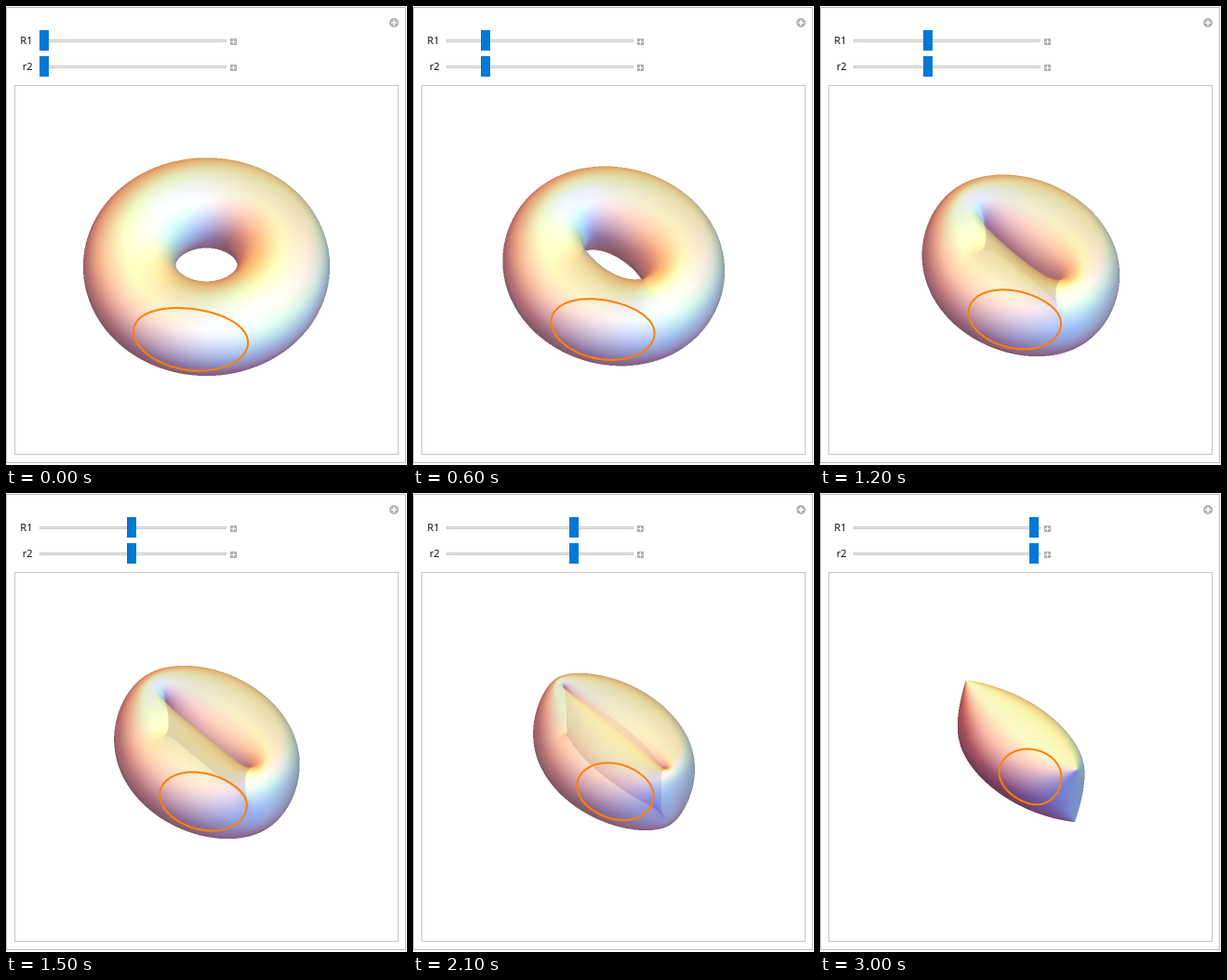
These frames come from a looping animation (431x494 px, 4000 ms). An HTML page with a canvas:

```html
<!DOCTYPE html>
<html lang="en">
<head>
<meta charset="utf-8">
<title>Torus with two varying radii</title>
<style>
html, body { margin: 0; width: 100%; height: 100%; overflow: hidden; background: #fff; }
canvas, svg { position: absolute; display: block; }
canvas { left: 80px; top: 160px; width: 272px; height: 240px; }
svg { left: 0; top: 0; }
text { font: 11px "Noto Sans", "Open Sans", sans-serif; fill: #111; text-anchor: end; }
</style>
</head>
<body>
<canvas id="solid" width="544" height="480"></canvas>
<svg width="431" height="494" viewBox="0 0 431 494" fill="none">
  <rect x="0.5" y="1.5" width="429" height="490" stroke="#b9b9b9"/>
  <rect x="9.5" y="85.5" width="412" height="397" stroke="#c6c6c6"/>
  <circle cx="417" cy="18" r="5" fill="#b2b2b2"/>
  <path d="M414 18h6M417 15v6" stroke="#fff" stroke-width="1.6"/>
  <g id="sliders"></g>
  <path id="loop" stroke="#ff8000" stroke-width="2"/>
</svg>
<script>
const STEPS = 10, STEP_MS = 300, LOOP_MS = 4000;
const UNIT = 16.56, CX = 215.5, CY = 278, CAMERA = 2100;
const R = 5, TUBE = 3;
const LEFT = 80, TOP = 160, SS = 2, W = 544, H = 480;
const NU = 160, NV = 80, LAYERS = 6, OPACITY = 0.77, GLOSS = 0.24;
const TAU = 2 * Math.PI;

// View along (1, 1, 2): image right, image up, toward the viewer
const dot = (a, b) => a[0] * b[0] + a[1] * b[1] + a[2] * b[2];
const unit = a => { const n = Math.hypot(...a) || 1; return a.map(c => c / n); };
const AXES = [[-1, 1, 0], [-1, -1, 1], [1, 1, 2]].map(unit);
const toView = p => AXES.map(a => dot(a, p));

const AMBIENT = [0.4, 0.2, 0.2];
const LIGHTS = [
  [[1.5, -0.5, 1.5], [0, 0.18, 0.5]],
  [[1.5, 1.5, 2.5], [0.18, 0.5, 0.18]],
  [[-0.5, 1.5, 1.5], [0.5, 0.18, 0]],
  [[-0.5, -0.5, 1.5], [0, 0, 0.18]]
].map(([at, rgb]) => {
  const dir = unit(at);
  return { dir, rgb, half: unit([dir[0], dir[1], dir[2] + 1]) };
});

function shade(n) {
  const c = AMBIENT.slice();
  for (const { dir, half, rgb } of LIGHTS) {
    const d = dot(n, dir);
    if (d <= 0) continue;
    const k = d + GLOSS * Math.max(0, dot(n, half)) ** 3;
    for (let i = 0; i < 3; i++) c[i] += k * rgb[i];
  }
  return c.map(x => Math.min(1, x) * 255);
}

const radii = k => ({ R1: R * (1 - k / STEPS), r2: TUBE * (1 - k / STEPS) });

function project(u, v, { R1, r2 }) {
  const p = toView([
    (R1 + TUBE * Math.cos(v)) * Math.cos(u),
    (R + r2 * Math.cos(v)) * Math.sin(u),
    TUBE * Math.sin(v)
  ]).map(c => c * UNIT);
  const s = CAMERA / (CAMERA - p[2]);
  return { x: CX + p[0] * s, y: CY - p[1] * s, z: p[2] };
}

function normal(u, v, { R1, r2 }) {
  const cu = Math.cos(u), su = Math.sin(u), cv = Math.cos(v), sv = Math.sin(v);
  const a = R1 + TUBE * cv, b = R + r2 * cv;
  return unit(toView([
    b * TUBE * cu * cv,
    a * TUBE * su * cv,
    sv * (a * r2 * su * su + b * TUBE * cu * cu)
  ]));
}

function vertex(u, v, rad) {
  const p = project(u, v, rad), n = normal(u, v, rad);
  return {
    x: (p.x - LEFT) * SS, y: (p.y - TOP) * SS, z: p.z,
    front: shade(n), back: shade(n.map(c => -c))
  };
}

const depth = new Float32Array(W * H * LAYERS);
const color = new Float32Array(W * H * LAYERS * 3);
const count = new Uint8Array(W * H);

// Keep the fragments of each pixel sorted, nearest first
function addFragment(px, z, r, g, b) {
  const base = px * LAYERS;
  let i = count[px];
  if (i === LAYERS) {
    if (depth[base + i - 1] >= z) return;
    i--;
  } else count[px]++;
  while (i > 0 && depth[base + i - 1] < z) {
    depth[base + i] = depth[base + i - 1];
    const to = (base + i) * 3;
    color.copyWithin(to, to - 3, to);
    i--;
  }
  depth[base + i] = z;
  const at = (base + i) * 3;
  color[at] = r; color[at + 1] = g; color[at + 2] = b;
}

function fillTriangle(a, b, c) {
  const area = (b.x - a.x) * (c.y - a.y) - (b.y - a.y) * (c.x - a.x);
  if (Math.abs(area) < 1e-7) return;
  const side = area < 0 ? "front" : "back";
  const ca = a[side], cb = b[side], cc = c[side];
  const corners = [a, b, c];
  const y0 = Math.max(0, Math.ceil(Math.min(a.y, b.y, c.y) - 0.5));
  const y1 = Math.min(H, Math.ceil(Math.max(a.y, b.y, c.y) - 0.5));
  for (let y = y0; y < y1; y++) {
    const py = y + 0.5;
    let lo = Infinity, hi = -Infinity;
    for (let i = 0; i < 3; i++) {
      let p = corners[i], q = corners[(i + 1) % 3];
      if (p.y > q.y) [p, q] = [q, p];
      if (py < p.y || py >= q.y) continue;
      const x = p.x + (q.x - p.x) * (py - p.y) / (q.y - p.y);
      lo = Math.min(lo, x);
      hi = Math.max(hi, x);
    }
    const x0 = Math.max(0, Math.ceil(lo - 0.5)), x1 = Math.min(W, Math.ceil(hi - 0.5));
    for (let x = x0; x < x1; x++) {
      const px = x + 0.5;
      const wb = ((px - a.x) * (c.y - a.y) - (py - a.y) * (c.x - a.x)) / area;
      const wc = ((b.x - a.x) * (py - a.y) - (b.y - a.y) * (px - a.x)) / area;
      const wa = 1 - wb - wc;
      addFragment(y * W + x, wa * a.z + wb * b.z + wc * c.z,
        wa * ca[0] + wb * cb[0] + wc * cc[0],
        wa * ca[1] + wb * cb[1] + wc * cc[1],
        wa * ca[2] + wb * cb[2] + wc * cc[2]);
    }
  }
}

function composite() {
  const image = new ImageData(W, H), out = image.data;
  for (let px = 0; px < W * H; px++) {
    let r = 0, g = 0, b = 0, left = 1;
    for (let i = 0; i < count[px]; i++) {
      const at = (px * LAYERS + i) * 3, k = left * OPACITY;
      r += k * color[at];
      g += k * color[at + 1];
      b += k * color[at + 2];
      left -= k;
    }
    const white = left * 255, o = px * 4;
    out[o] = r + white;
    out[o + 1] = g + white;
    out[o + 2] = b + white;
    out[o + 3] = 255;
  }
  return image;
}

function renderSolid(k) {
  const rad = radii(k), mesh = [];
  for (let i = 0; i < NU; i++) {
    const row = [];
    for (let j = 0; j < NV; j++) row.push(vertex(i / NU * TAU, j / NV * TAU, rad));
    mesh.push(row);
  }
  count.fill(0);
  for (let i = 0; i < NU; i++) {
    const row = mesh[i], next = mesh[(i + 1) % NU];
    for (let j = 0; j < NV; j++) {
      const m = (j + 1) % NV;
      fillTriangle(row[j], next[j], next[m]);
      fillTriangle(row[j], next[m], row[m]);
    }
  }
  return composite();
}

// An ellipse in the parameter plane, carried onto the surface
function loopPath(k) {
  const rad = radii(k), pts = [];
  for (let i = 0; i < 120; i++) {
    const t = i / 120 * TAU;
    const p = project(0.637 + 0.5 * Math.cos(t), 0.637 + 0.75 * Math.sin(t), rad);
    pts.push(p.x.toFixed(2) + " " + p.y.toFixed(2));
  }
  return "M" + pts.join("L") + "Z";
}

const slider = (label, y) => `
  <text x="28.5" y="${y + 4}">${label}</text>
  <rect x="36.5" y="${y - 0.5}" width="200" height="2" fill="#ececec" stroke="#c9c9c9"/>
  <rect class="thumb" y="${y - 11}" width="10" height="22" fill="#0078d7"/>
  <rect x="241" y="${y - 2}" width="7" height="7" fill="#b0b0b0"/>
  <path d="M242 ${y + 1.5}h5M244.5 ${y - 1}v5" stroke="#fff"/>`;

document.getElementById("sliders").innerHTML = slider("R1", 37) + slider("r2", 65);
const thumbs = document.querySelectorAll(".thumb");
const loop = document.getElementById("loop");
const ctx = document.getElementById("solid").getContext("2d");
const cache = [];
let shown = -1;

function draw(ms) {
  const k = Math.min(STEPS, Math.floor(ms % LOOP_MS / STEP_MS));
  if (k === shown) return;
  shown = k;
  cache[k] ||= renderSolid(k);
  ctx.putImageData(cache[k], 0, 0);
  loop.setAttribute("d", loopPath(k));
  thumbs.forEach(t => t.setAttribute("x", Math.floor(36 + 18.9 * k)));
}

const start = performance.now();
function tick() {
  draw(performance.now() - start);
  requestAnimationFrame(tick);
}
tick();
</script>
</body>
</html>
```
